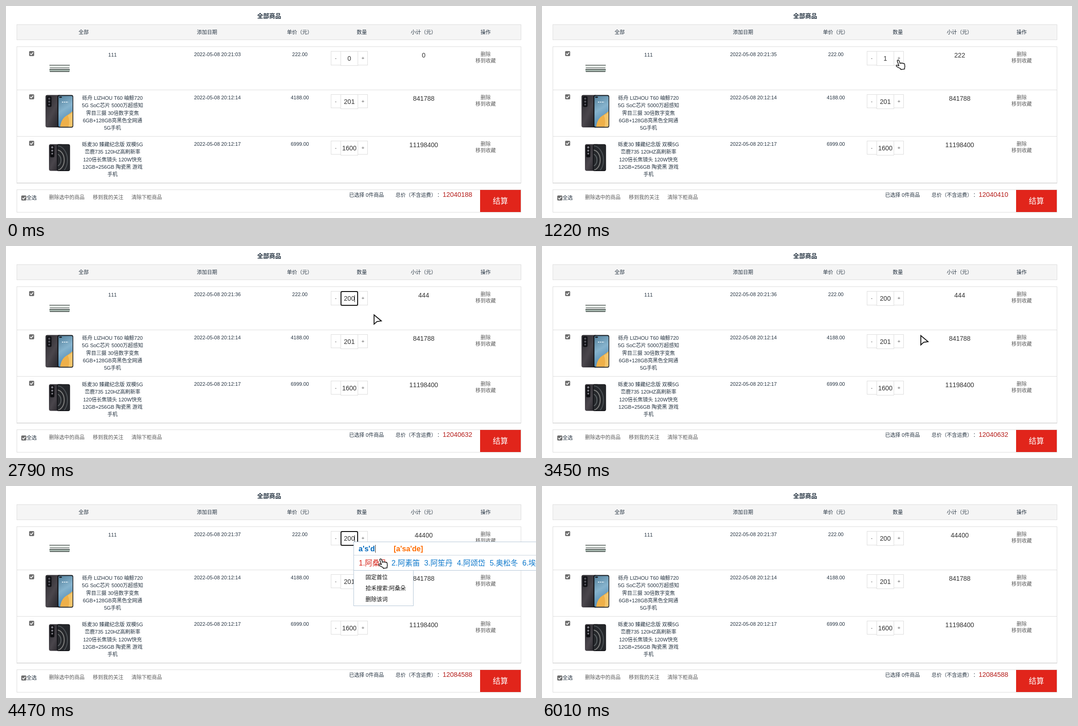
Recreate the animation shown at these times as an HTML page. Size 1147x461 px, loop 6170 ms.

```html
<!DOCTYPE html>
<html lang="zh-CN">
<head>
<meta charset="utf-8">
<title>全部商品</title>
<style>
html, body { margin: 0; width: 100%; height: 100%; overflow: hidden; background: #fff; }
svg { display: block; width: 1147px; height: 461px; }
text {
  font-family: "Liberation Sans", "Noto Sans CJK SC", "Noto Sans CJK", sans-serif;
  font-kerning: none;
  text-spacing-trim: space-all;
  white-space: pre;
}
</style>
</head>
<body>
<svg id="stage" viewBox="0 0 1147 461" xmlns="http://www.w3.org/2000/svg">
  <defs>
    <linearGradient id="back" x2="1" y2="1">
      <stop offset="0" stop-color="#2b2a2f"/><stop offset=".5" stop-color="#4a464c"/><stop offset="1" stop-color="#1d1c21"/>
    </linearGradient>
    <linearGradient id="sky" x2=".3" y2="1">
      <stop offset="0" stop-color="#54809b"/><stop offset=".5" stop-color="#86b3cd"/><stop offset="1" stop-color="#4b88b4"/>
    </linearGradient>
    <clipPath id="screenA"><rect x="113.5" y="195.5" width="30.5" height="67" rx="2.5"/></clipPath>
    <clipPath id="screenB"><rect x="112" y="302" width="25" height="55" rx="2"/></clipPath>
  </defs>
  <g id="page"></g>
  <g id="photos">
    <g>
      <rect x="94" y="128" width="44" height="7" rx="1" fill="#e6ebe7"/>
      <path d="M94 128.7H138M95 134.5H137" stroke="#3b4341" stroke-width="1.2"/>
      <rect x="94" y="137" width="44" height="6" rx="1" fill="#a5b5ad"/>
      <path d="M94 137.7H138M95 142.7H137" stroke="#28302d" stroke-width="1.3"/>
    </g>
    <g>
      <rect x="85.5" y="193.5" width="34" height="70.5" rx="4" fill="url(#back)"/>
      <rect x="88.5" y="196.5" width="10" height="23" rx="3" fill="#0f0f13"/>
      <g fill="#55545c"><circle cx="93.5" cy="201.5" r="2.3"/><circle cx="93.5" cy="208" r="2.3"/><circle cx="93.5" cy="214.5" r="2"/></g>
      <rect x="111" y="193.5" width="34.5" height="71" rx="4" fill="#16181c"/>
      <g clip-path="url(#screenA)">
        <rect x="113" y="195" width="32" height="69" fill="url(#sky)"/>
        <path d="M117 264Q119 246 130 239T145 228V264Z" fill="#eeb04a"/>
        <path d="M134 238Q139 249 135 264H145V231Z" fill="#f4c56b"/>
      </g>
      <rect x="115" y="197" width="6" height="2.4" rx="1.2" fill="#16181c"/>
      <path d="M121 209H135" stroke="#dcebf4" stroke-width="2" stroke-dasharray="3 1.5"/>
    </g>
    <g>
      <rect x="93" y="300.5" width="30" height="58" rx="4" fill="url(#back)"/>
      <rect x="95.5" y="303" width="9" height="26" rx="2.5" fill="#0d0d10"/>
      <g fill="#7d7c84"><circle cx="100" cy="307.5" r="2.4"/><circle cx="100" cy="314.5" r="2.2"/><circle cx="100" cy="321" r="1.9"/></g>
      <rect x="110" y="300.5" width="28.5" height="58.5" rx="4" fill="#141519"/>
      <g clip-path="url(#screenB)" fill="none" stroke-width="2">
        <rect x="112" y="302" width="25" height="55" fill="#25272b"/>
        <ellipse cx="110" cy="335" rx="9" ry="13" stroke="#5b6163"/>
        <ellipse cx="110" cy="335" rx="16" ry="22" stroke="#80807e"/>
        <ellipse cx="110" cy="335" rx="23" ry="31" stroke="#4c5155"/>
      </g>
    </g>
  </g>
  <rect id="focus" x="725" y="99" width="36" height="30" rx="2.5" fill="none" stroke="#101010" stroke-width="2"/>
  <path id="caret" stroke="#222" d="M0 107V122"/>
  <g id="ime"></g>
  <circle id="halo" r="12" fill="#ffeb00" fill-opacity=".6"/>
  <g id="cursor">
    <path id="hand" fill="#fff" stroke="#111" stroke-width="1.5" stroke-linejoin="round" transform="translate(-1.5 .5) rotate(-8)"
      d="M-2 1.6C-1.5-.6 1.4-.6 2 1.6L3.4 8.2C5 6.6 6.6 7 7 8.6 8.4 7.2 10 8 10.3 9.6 12 8.6 13 9.6 12.8 11.5V16.5L11.5 19V21.3H3V19.5L-5 13.5C-6.6 11.4-5 9.8-3 10.8L.2 12.6Z"/>
    <path id="beam" fill="none" stroke="#333" stroke-width="1.7" d="M-3.5-10H-1L0-9 1-10H3.5M-3.5 9H-1L0 8 1 9H3.5M0-9V8"/>
    <path id="arrow" fill="#fff" stroke="#111" stroke-width="1.9" d="M.8.8V21L7 15.4 16.5 14Z"/>
  </g>
</svg>
<script>
const LOOP = 6170;
const DARK = '#263442', LINK = '#5c5c5c', LINE = '#ddd', RED = '#e1251b';
const $ = id => document.getElementById(id);

function add(parent, tag, attrs) {
  const el = document.createElementNS('http://www.w3.org/2000/svg', tag);
  for (const k in attrs) el.setAttribute(k, attrs[k]);
  return parent.appendChild(el);
}
const page = $('page'), ime = $('ime');

function label(str, x, y, o = {}) {
  const el = add(o.on || page, 'text', {
    x, y, 'font-size': o.size || 11, fill: o.fill || DARK,
    'text-anchor': o.mid ? 'middle' : 'start', 'font-weight': o.bold ? 700 : 400
  });
  el.textContent = str;
  return el;
}
const box = (x, y, w, h, fill = '#fff', stroke = LINE, on = page) =>
  add(on, 'rect', { x: x + .5, y: y + .5, width: w, height: h, fill, stroke });
const hline = (y, x1 = 23, x2 = 1115, stroke = LINE, on = page) =>
  add(on, 'path', { d: `M${x1} ${y + .5}H${x2}`, stroke });

function check(x, y) {
  add(page, 'rect', { x: x - 5.5, y: y - 5.5, width: 11, height: 11, rx: 2, fill: '#6f6f6f' });
  add(page, 'path', { d: `M${x - 3.3} ${y}l2.3 2.5 4.4-5`, fill: 'none', stroke: '#fff', 'stroke-width': 1.7 });
}

// Table head
label('全部商品', 569.5, 26, { size: 13, bold: true, mid: true });
box(23, 40, 1091, 33, '#f5f5f5');
[['全部', 157], ['添加日期', 413], ['单价（元）', 608], ['数量', 759], ['小计（元）', 876], ['操作', 1027]]
  .forEach(([s, x]) => label(s, x, 61));

// Product rows
box(23, 88, 1091, 296);
hline(182);
hline(283);
hline(385);
const rows = [
  { y: 0, h: 30, name: ['111'], date: '', price: '222.00', qty: '', sum: '' },
  { y: 94, h: 29, name: ['砾舟 LIZHOU T60 岫鲸720', '5G SoC芯片 5000万超感知', '霁目三摄 30倍数字变焦', '6GB+128GB亮黑色全网通', '5G手机'],
    date: '2022-05-08 20:12:14', price: '4188.00', qty: '201', sum: '841788' },
  { y: 195, h: 29, name: ['砾麦30 臻藏纪念版 双模5G', '峦鹿735 120HZ高刷新率', '120倍长焦镜头 120W快充', '12GB+256GB 陶瓷黑 游戏', '手机'],
    date: '2022-05-08 20:12:17', price: '6999.00', qty: '1600', sum: '11198400' }
].map(({ y, h, name, date, price, qty, sum }) => {
  check(55.5, 103.5 + y);
  name.forEach((s, i) => label(s, 230.5, 110 + y + i * 16.25, { mid: true }));
  box(703, 98 + y, 79, h);
  box(724, 98 + y, 37, 31);
  label('-', 713.5, 117 + y, { mid: true, fill: LINK });
  label('+', 772.5, 117 + y, { mid: true, fill: LINK });
  label('删除', 1027, 109 + y, { fill: LINK });
  label('移到收藏', 1016, 123 + y, { fill: LINK });
  label(price, 636, 109 + y, { mid: true, size: 10.9 });
  const big = { mid: true, size: 14, fill: '#333' };
  return {
    date: label(date, 407, 109 + y, { size: 10.9 }),
    qty: label(qty, 743, 119 + y, big),
    sum: label(sum, 904, 112 + y, big)
  };
});

// Footer
box(23, 399, 1091, 49);
check(38.5, 417.5);
label('全选', 44.5, 421);
[['删除选中的商品', 93], ['移到我的关注', 188], ['清除下柜商品', 271.5]]
  .forEach(([s, x]) => label(s, x, 420, { fill: LINK }));
label('已选择 0件商品', 742.5, 415);
label('总价（不含运费）', 843, 415);
label('：', 933, 415);
const total = label('', 945, 415, { size: 14.4, fill: '#b51d1a' });
add(page, 'rect', { x: 1026, y: 400, width: 88, height: 48, fill: RED });
label('结算', 1070, 430, { size: 16.5, mid: true, fill: '#fff' });

// Input method popup
const EDGE = '#b4c6d6', BLUE = '#0c78cc';
const menu = add(ime, 'g', {});
box(752, 183, 129, 77, '#fff', EDGE, menu);
['固定首位', '拾禾搜索:阿桑朵', '删除该词'].forEach((s, i) =>
  label(s, 778, 202.5 + i * 24, { size: 12, fill: '#111', on: menu }));
box(752, 121, 400, 62, '#fff', EDGE, ime);
hline(150, 753, 1147, '#c9d5df', ime);
const typed = label('', 763, 142, { size: 16, bold: true, fill: '#0069bd', on: ime });
const hint = label("[a'sa'de]", 839, 142, { size: 16, bold: true, fill: '#ff6c00', on: ime });
const imeCaret = add(ime, 'path', { stroke: '#333' });
['阿桑朵', '阿素笛', '阿笙丹', '阿颂岱', '奥松冬', '埃信达'].forEach((s, i) =>
  label(`${i + 1}.${s}`, 763.5 + i * 70.8, 173, { size: 16, fill: i ? BLUE : '#d8261c', on: ime }));

// Timelines: the last entry whose time has come applies
const at = (list, t) => list.reduce((v, e) => t >= e[0] ? e[1] : v, list[0][1]);
const within = (t, spans) => spans.some(([a, b]) => t >= a && t < b);

const qtyLine = [[0, '0'], [940, '1'], [1560, '2'], [2400, '20'], [2580, '200']];
const bought = [[0, 0], [970, 1], [1590, 2], [3510, 200]];
const seconds = [[0, '03'], [970, '35'], [1590, '36'], [3510, '37']];
const typing = [[0, ''], [4120, 'a'], [4180, "a's"], [4240, "a's'd"]];
const focusOn = [[1860, 3180], [3930, 4740]];
const clicks = [[910, 1040], [1530, 1660], [1860, 2040], [3150, 3300], [3900, 4020], [4740, 4800], [5400, 5530]];
const shapes = [[0, 'arrow'], [400, 'hand'], [1740, 'beam'], [2690, 'arrow'], [3800, 'beam'],
  [4290, 'hand'], [4650, 'arrow'], [5330, 'hand']];
const path = [[80, 1044, 432], [380, 700, 96], [500, 764, 107], [690, 764, 107], [720, 772, 117],
  [1660, 772, 117], [1860, 751, 117], [2660, 751, 117], [2820, 800, 152], [3060, 823, 213],
  [3300, 819, 194], [3540, 819, 194], [3870, 751, 117], [4240, 751, 117], [4400, 812, 158],
  [4560, 812, 158], [4700, 849, 176], [5030, 849, 176], [5390, 1062, 419], [5500, 1062, 419],
  [5570, 1062, 425], [5670, 1062, 425], [6010, 1074, 462]];

function place(t) {
  const i = path.findIndex(p => p[0] > t);
  if (i < 1) return path[i ? path.length - 1 : 0].slice(1);
  const [a, ax, ay] = path[i - 1], [b, bx, by] = path[i];
  const u = (t - a) / (b - a), e = u * u * (3 - 2 * u);
  return [ax + (bx - ax) * e, ay + (by - ay) * e];
}
const show = (el, on) => el.setAttribute('display', on ? 'inline' : 'none');

function draw(t) {
  const qty = at(qtyLine, t), sum = at(bought, t) * 222;
  rows[0].date.textContent = '2022-05-08 20:21:' + at(seconds, t);
  rows[0].qty.textContent = qty;
  rows[0].sum.textContent = sum;
  total.textContent = 12040188 + sum;

  const focused = within(t, focusOn);
  show($('focus'), focused);
  show($('caret'), focused);
  $('caret').setAttribute('transform', `translate(${Math.round(743 + qty.length * 4) - .5})`);

  const word = at(typing, t);
  show(ime, within(t, [[4120, 4680]]));
  show(menu, within(t, [[4430, 4620]]));
  show(hint, word.length > 3);
  typed.textContent = word;
  const end = [763, 772.5, 785.5, 799.5][(word.length + 1) >> 1];
  imeCaret.setAttribute('d', `M${end} 128V145`);

  const [x, y] = place(t), shape = at(shapes, t), visible = within(t, [[80, 6010]]);
  show($('cursor'), visible);
  $('cursor').setAttribute('transform', `translate(${x} ${y})`);
  for (const s of ['hand', 'beam', 'arrow']) show($(s), s === shape);
  show($('halo'), visible && within(t, clicks));
  $('halo').setAttribute('cx', x - (shape === 'beam' ? 1.5 : 0));
  $('halo').setAttribute('cy', y);
}

const start = performance.now();
function tick() {
  draw((performance.now() - start) % LOOP);
  requestAnimationFrame(tick);
}
tick();
</script>
</body>
</html>
```
